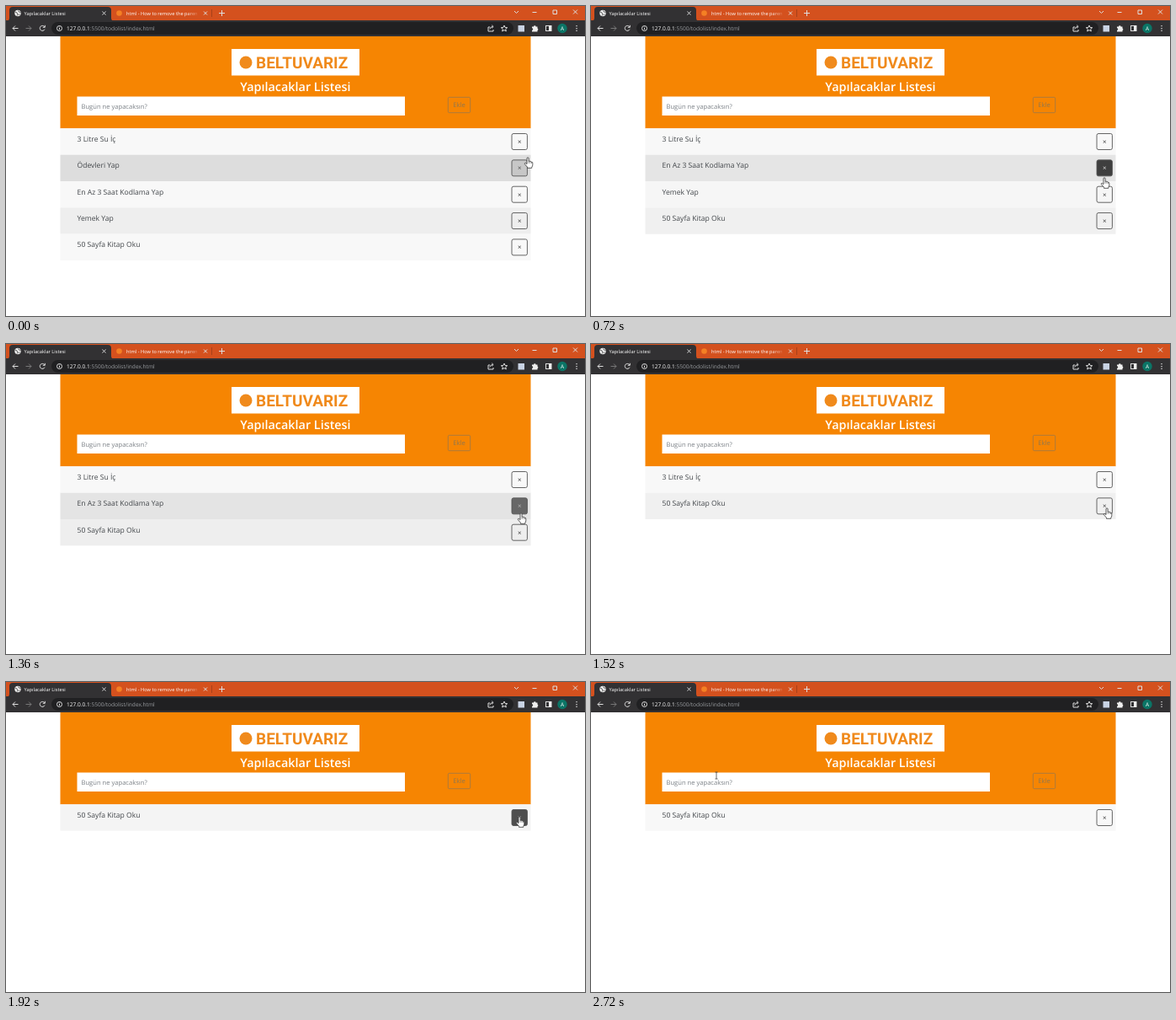
Write an HTML page that moves like this. It is 688 px wide and 368 px high and loops after 2.8 s.

```html
<!DOCTYPE html>
<html lang="tr">
<head>
<meta charset="utf-8">
<title>Yapılacaklar Listesi</title>
<style>
  html, body { margin: 0; width: 100%; height: 100%; overflow: hidden; background: #fff; }
  svg { display: block; width: 688px; height: 368px; font-family: "Open Sans", "Noto Sans", sans-serif; text-rendering: geometricPrecision; }
  .line { fill: none; stroke: #dedede; stroke-width: 1; }
  .dim { stroke: #777; }
  .tab { font-size: 5.7px; fill: #fff; }
  .item { font-size: 8.6px; fill: #43474b; }
  .times { font-size: 8px; text-anchor: middle; }
</style>
</head>
<body>
<svg viewBox="0 0 688 368">
  <defs>
    <linearGradient id="fade" x1="0" x2="1">
      <stop offset="0" stop-color="#d4511e" stop-opacity="0"/>
      <stop offset="1" stop-color="#d4511e"/>
    </linearGradient>
  </defs>

  <!-- tab strip -->
  <rect width="688" height="20" fill="#d4511e"/>
  <path d="M0 18Q4 18 4 14V5Q4 1 8 1H121Q125 1 125 5V14Q125 18 129 18Z" fill="#323133"/>
  <circle cx="14" cy="8.5" r="3.7" fill="#eee"/>
  <path d="M11 7l2 1 1 2-1 1.500M14.500 5.500l1 1.500 2 .5M15 11l1-1.500" fill="none" stroke="#444" stroke-width=".9"/>
  <text class="tab" x="21.500" y="10.600">Yapılacaklar Listesi</text>
  <path class="line" d="M114.500 6.500l4 4m0-4l-4 4"/>
  <circle cx="134.500" cy="8.500" r="3.300" fill="#f48024"/>
  <text class="tab" x="143" y="10.600">html - How to remove the paren</text>
  <rect x="214" y="3" width="17" height="11" fill="url(#fade)"/>
  <path class="line" d="M235 6.500l4 4m0-4l-4 4M253 8.500h7m-3.500-3.500v7M604 6l2.500 2.500 2.500-2.500M625.500 7.500h5M650 5h4.500v4.500h-4.500zM674 4.500l5 5m0-5l-5 5"/>
  <path d="M244.500 4v9" stroke="#a8411a"/>

  <!-- toolbar -->
  <rect y="17" width="688" height="19" fill="#323133"/>
  <rect x="54" y="19" width="549" height="15" rx="7.500" fill="#202022"/>
  <path class="line" d="M14.500 26.500h-6.500m3-3l-3 3 3 3"/>
  <path class="line dim" d="M23.500 26.500h6.500m-3-3l3 3-3 3"/>
  <path class="line" d="M45.800 24.800a3 3 0 1 0 .2 2.800M46.300 22.800v2.500h-2.500"/>
  <circle class="line" cx="63.500" cy="26.500" r="3" stroke-width=".8"/>
  <path class="line" d="M63.500 26v2.200M63.500 24.600v.7"/>
  <text x="72" y="28.900" font-size="6.560" fill="#9a9da1"><tspan fill="#fff">127.0.0.1</tspan>:5500/todolist/index.html</text>
  <path class="line" stroke-width=".8" d="M575 25h-2v5h6v-2M574.800 27.500q.5-3 4-3m-1.500-1.700l1.800 1.700-1.800 1.700"/>
  <path class="line" stroke-width=".8" d="M592 23l1.100 2.500 2.600.2-2 1.700.6 2.600-2.300-1.400-2.300 1.400.6-2.600-2-1.700 2.600-.2z"/>
  <rect x="608.500" y="23" width="7.500" height="7.500" fill="#c9d3e4"/>
  <path d="M625 24.500h2a1.300 1.300 0 0 1 2.600 0h1.900v2a1.300 1.300 0 0 1 0 2.400v1.600h-6.500v-1.800a1.200 1.200 0 0 0 0-2.400z" fill="#eee"/>
  <rect class="line" x="641.500" y="23.500" width="6.500" height="6"/>
  <path d="M645 23h3v7h-3z" fill="#eee"/>
  <circle cx="661" cy="26.500" r="5.700" fill="#0b7566"/>
  <text x="661" y="28.900" font-size="6.500" fill="#fff" text-anchor="middle">A</text>
  <path d="M677.400 23h1.300v1.300h-1.300zm0 2.900h1.300v1.300h-1.300zm0 2.900h1.300v1.300h-1.300z" fill="#ddd"/>

  <!-- page header -->
  <rect x="64.500" y="36" width="559" height="109.300" fill="#f68502"/>
  <rect x="268" y="51" width="152" height="31.500" fill="#fff"/>
  <circle cx="285" cy="67" r="7.500" fill="#f08a1c"/>
  <text x="297" y="73.800" font-family="Roboto, sans-serif" font-weight="700" font-size="19" fill="#f08a1c">BELTUVARIZ</text>
  <text x="344" y="100.500" font-size="14.400" font-weight="600" fill="#fff" text-anchor="middle">Yapılacaklar Listesi</text>
  <rect x="84.500" y="107.500" width="389.500" height="22.500" fill="#fff"/>
  <text x="89.500" y="121.800" font-size="7.600" fill="#7b8086">Bugün ne yapacaksın?</text>
  <rect x="525.300" y="108.300" width="26.400" height="18.400" rx="1.500" fill="none" stroke="#a57a42" stroke-width=".9"/>
  <text x="538.500" y="120.300" font-size="7.600" fill="#8f7750" text-anchor="middle">Ekle</text>

  <g id="list"></g>

  <g id="hand" fill="#fff" stroke="#333" stroke-width=".8" stroke-linejoin="round">
    <path d="M-1 6V1Q-1-.2 0-.2T1.100 1V4.300Q2.300 3.700 2.900 4.600 4 4.200 4.500 5.200 5.800 5 5.800 6.500V8.500Q5.800 10 4.800 11.200V12.300H-.5V11.200L-3.600 7.600Q-4 6.300-2.700 6.300L-1 7.600Z"/>
    <path d="M1.100 4.300v2.500M2.900 4.600v2.200M4.500 5.200v1.800" stroke-width=".5"/>
  </g>
  <path id="arrow" d="M0 0V8L1.900 6.400 3.100 9.200 4.400 8.600 3.200 5.900H5.700Z" fill="#fff" stroke="#333" stroke-width=".7"/>
  <path id="beam" d="M-1.500-4H1.500M0-4V4M-1.500 4H1.500" fill="none" stroke="#444" stroke-width=".8"/>
</svg>
<script>
const LOOP = 2800, STEP = 80, TOP = 145.3, ROW = 31.35;
const ODD = 248, EVEN = 238, HOVER = 221;

// label and the time the task is deleted
const tasks = [
  ['3 Litre Su İç', 1920],
  ['Ödevleri Yap', 640],
  ['En Az 3 Saat Kodlama Yap', 1520],
  ['Yemek Yap', 1040],
  ['50 Sayfa Kitap Oku', Infinity]
];

// pointer: time, x, y
const path = [
  [0, 620, 180], [240, 611, 190], [560, 609, 192], [640, 609, 195], [720, 610, 204],
  [880, 610, 219], [1120, 611, 221], [1280, 612, 208], [1440, 612, 194], [1520, 613, 195],
  [1600, 614, 175], [1760, 617, 163], [1840, 615, 161], [1920, 610, 160], [2000, 570, 157],
  [2080, 515, 149], [2160, 465, 139], [2320, 330, 124], [2560, 178, 113], [2720, 149, 111]
];

// darkness of the button under the pointer: time, amount
const press = [
  [0, .12], [160, .9], [640, .9], [720, .86], [800, .3], [880, .9], [960, .9],
  [1040, 0], [1120, .1], [1200, .7], [1280, .4], [1440, .9], [1520, 0], [1600, .5],
  [1680, .1], [1760, .26], [1840, .9], [1920, .8], [2000, .4], [2080, 0]
];

const mix = (a, b, k) => a + (b - a) * k;
const gray = v => `rgb(${v},${v},${v})`;

function track(keys, t, col) {
  const i = keys.findIndex(k => k[0] > t);
  if (i < 0) return keys[keys.length - 1][col];
  const [a, b] = [keys[i - 1], keys[i]];
  return mix(a[col], b[col], (t - a[0]) / (b[0] - a[0]));
}

const pointer = t => [track(path, t, 1), track(path, t, 2)];
const slotAt = y => Math.floor((y - TOP) / ROW);
const alive = t => tasks.map((_, i) => i).filter(i => t < tasks[i][1]);
const base = slot => slot % 2 ? EVEN : ODD;

// row shades ease towards their stripe or hover colour at every step
function buildShades() {
  let now = tasks.map((_, i) => i === 1 ? HOVER : base(i));
  const all = [now];
  for (let t = STEP; t < LOOP; t += STEP) {
    const hovered = alive(t - STEP)[slotAt(pointer(t - STEP)[1])];
    const rows = alive(t);
    now = now.map((v, i) => mix(v, i === hovered ? HOVER : base(rows.indexOf(i)), .6));
    all.push(now);
  }
  return all;
}
const shades = buildShades();

const byId = id => document.getElementById(id);
function add(parent, tag, attrs, text = '') {
  const el = document.createElementNS('http://www.w3.org/2000/svg', tag);
  for (const key in attrs) el.setAttribute(key, attrs[key]);
  el.textContent = text;
  return parent.appendChild(el);
}

const rows = tasks.map(([label]) => {
  const g = add(byId('list'), 'g', {});
  return {
    g,
    bg: add(g, 'rect', { x: 64.5, width: 559, height: ROW }),
    label: add(g, 'text', { x: 84.5, y: 15.8, class: 'item' }, label),
    button: add(g, 'rect', { x: 601, y: 6.2, width: 18.4, height: 19, rx: 2, stroke: '#555', 'stroke-width': .9 }),
    times: add(g, 'text', { x: 610.2, y: 18.6, class: 'times' }, '×')
  };
});

const cursors = ['hand', 'arrow', 'beam'].map(byId);
function cursorFor(x, y) {
  if (x > 599) return 'hand';
  return x < 474 && y > 107 && y < 130 ? 'beam' : 'arrow';
}

function draw(t) {
  const order = alive(t), shade = shades[t / STEP];
  const [x, y] = pointer(t), dark = track(press, t, 1);
  rows.forEach((r, i) => {
    const slot = order.indexOf(i);
    r.g.style.display = slot < 0 ? 'none' : '';
    if (slot < 0) return;
    const k = slot === slotAt(y) ? dark : 0;
    r.g.setAttribute('transform', `translate(0 ${TOP + slot * ROW})`);
    r.bg.setAttribute('fill', gray(shade[i]));
    r.button.setAttribute('fill', gray(mix(shade[i], 36, k)));
    r.times.setAttribute('fill', gray(mix(55, 255, k)));
  });
  const kind = cursorFor(x, y);
  cursors.forEach(c => {
    c.style.display = c.id === kind ? '' : 'none';
    c.setAttribute('transform', `translate(${x} ${y})`);
  });
}

const start = performance.now();
function tick() {
  const t = Math.max(0, performance.now() - start) % LOOP;
  draw(Math.floor(t / STEP) * STEP);
  requestAnimationFrame(tick);
}
tick();
</script>
</body>
</html>
```
